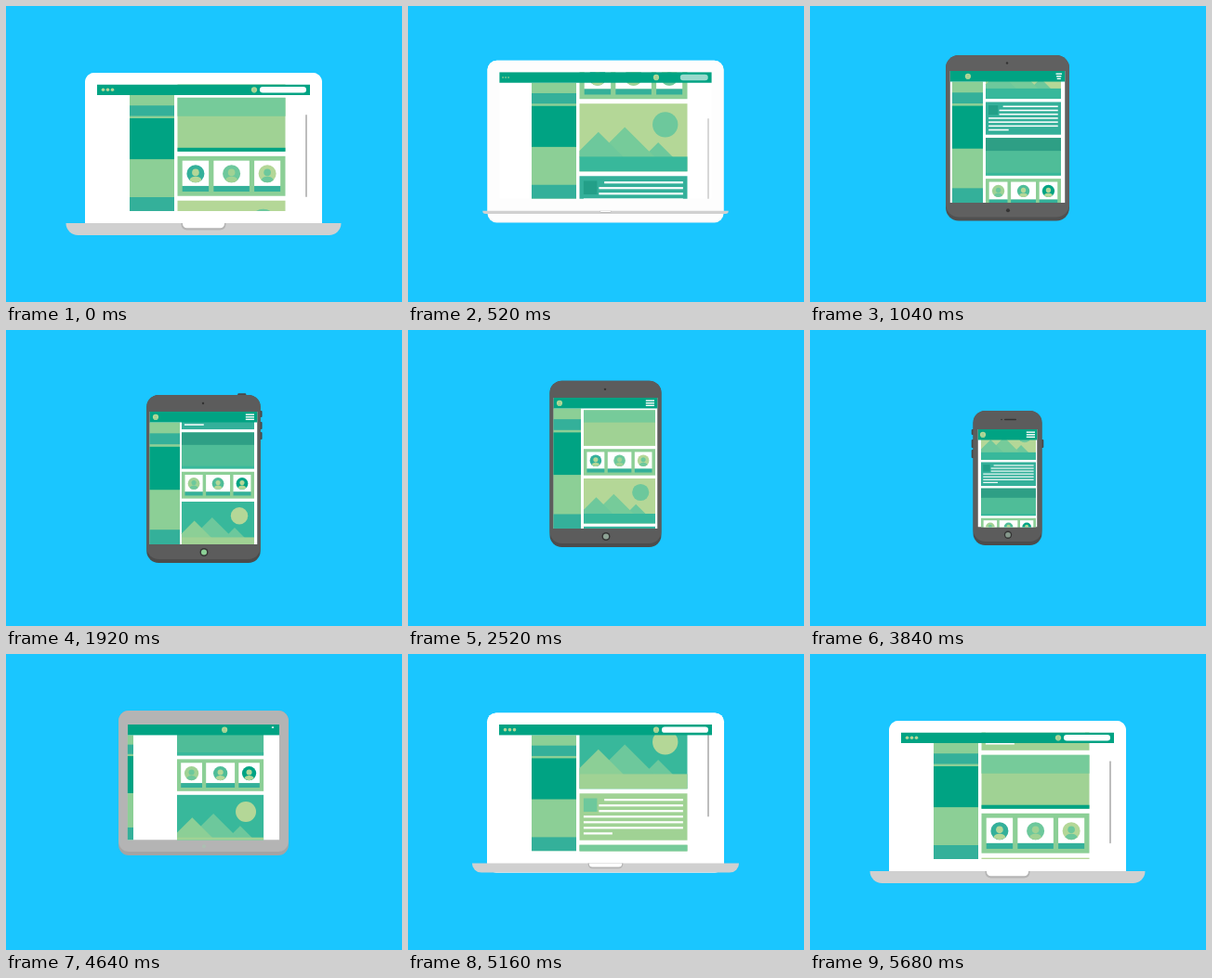
Write an HTML page that moves like this. It is 426 px wide and 319 px high and loops after 5.72 s.

```html
<!DOCTYPE html>
<html lang="en">
<head>
<meta charset="utf-8">
<title>Responsive devices</title>
<style>
  html, body { margin: 0; width: 100%; height: 100%; overflow: hidden; background: #1ac6ff; }
  svg { display: block; width: 100vw; height: 100vh; }
</style>
</head>
<body>
<svg id="stage" viewBox="0 0 426 319"></svg>
<script>
const LOOP = 5720;
const MID = 212.5;
const BAR = 11.5;
const C = {
  dark: '#00a383', deep: '#2e9f85', teal: '#34b09a', sea: '#38b89b', mint: '#4fbd98',
  soft: '#6dc89c', pale: '#76cb9a', leaf: '#8ccf96', lime: '#a0d294', sun: '#b4d797', white: '#fff'
};

// ---------- markup helpers ----------
const rect = (x, y, w, h, fill, more = '') =>
  `<rect x="${x}" y="${y}" width="${w}" height="${h}" fill="${fill}" ${more}/>`;
const circle = (x, y, r, fill, more = '') =>
  `<circle cx="${x}" cy="${y}" r="${r}" fill="${fill}" ${more}/>`;
const path = (d, fill, more = '') => `<path d="${d}" fill="${fill}" ${more}/>`;

function person(x, y, r, back, skin) {
  return `<g transform="translate(${x} ${y}) scale(${r / 10})">` + circle(0, 0, 10, back) +
    circle(0, -1.4, 4, skin) + path('M-6.8 7.3C-6 1.8 6 1.8 6.8 7.3A10 10 0 0 1-6.8 7.3Z', skin) + '</g>';
}

// ---------- feed blocks, drawn 100 units wide ----------
function textBlock(back, icon) {
  const starts = [23, 18, 18, 3.8, 3.8, 3.8, 3.8];
  return rect(0, 0, 100, 43.5, back) + rect(3.8, 4.5, 12.5, 12.5, icon) +
    starts.map((x, i) => rect(x, 5 + i * 5.2, (i < 6 ? 96 : 30.5) - x, 1.9, C.white)).join('');
}
function panelBlock(head, body, foot, id) {
  return rect(0, 0, 100, 50, body) + rect(0, 0, 100, 17.2, head) +
    rect(0, 46.5, 100, 3.5, foot, `id="${id}"`);
}
function cardBlock(looks) {
  const slots = [[4.5, 24.5], [33.5, 33.2], [71.2, 24.2]];
  return rect(0, 0, 100, 37, C.leaf) + slots.map(([x, w], i) =>
    rect(x, 4.2, w, 23.5, C.white) + rect(x, 27.7, w, 5.2, C.teal) +
    person(x + w / 2, 16.3, 8.2, ...looks[i])).join('');
}
function sceneBlock(sky, sun, hills, ground) {
  const peaks = [[73, 36], [42, 21.7], [17.5, 26.3]];
  return rect(0, 0, 100, 63, sky) + circle(79.5, 19.5, 11.8, sun) +
    peaks.map(([x, y], i) => {
      const half = Math.min(x, 50 - y);
      return path(`M${x} ${y}L${x + 50 - y} 50H${x - half}V${y + half}Z`, hills[i]);
    }).join('') + rect(0, 49.3, 100, 13.7, ground);
}

const blocks = [
  [43.5, textBlock(C.teal, '#239f88')],
  [50, panelBlock(C.deep, C.mint, C.sea, 'footTeal')],
  [37, cardBlock([[C.lime, C.soft], [C.mint, C.sun], [C.dark, C.sun]])],
  [63, sceneBlock(C.sea, C.sun, [C.soft, C.soft, C.leaf], C.lime)],
  [43.5, textBlock(C.lime, C.soft)],
  [50, panelBlock(C.pale, C.lime, C.dark, 'footDark')],
  [37, cardBlock([[C.teal, C.sun], [C.soft, C.lime], [C.sun, C.soft]])],
  [63, sceneBlock(C.sun, C.soft, [C.soft, C.pale, C.soft], C.sea)]
];
const GAP = 4.3;
let feedLength = 0;
const tops = blocks.map(([h]) => (feedLength += h + GAP) - h - GAP);

// ---------- stage ----------
const edge = '#484848';
const ink = '#333';
document.getElementById('stage').innerHTML = `
  <clipPath id="screenClip"><rect id="clipRect"/></clipPath>
  ${rect(0, 0, 426, 319, '#1ac6ff')}
  <g id="tabKeys">${[[17, 7], [29, 8], [40, 8]].map(([y, h]) => rect(-3, y, 3, h, edge, 'rx="1"')).join('')}</g>
  ${rect(0, 0, 9, 3, edge, 'rx="1" id="tabTop"')}
  <g id="phoneLeft">${[[20, 6], [31, 9], [42, 9]].map(([y, h]) => rect(0, y, 3, h, edge, 'rx="1"')).join('')}</g>
  ${rect(-3, 0, 3, 9, edge, 'rx="1" id="phoneRight"')}
  <rect id="lip"/><rect id="body"/>
  ${path('', '#d0d0d0', 'id="base"')}${path('', '#b5b5b5', 'id="notchEdge"')}${path('', C.white, 'id="notch"')}
  ${circle(212, 0, 1.2, ink, 'id="camera"')}
  <g id="speaker">${rect(209, -0.7, 13, 1.4, ink, 'rx=".7"')}${circle(206, 0, 0.8, ink)}</g>
  ${circle(213, 0, 0, ink, 'id="ring"')}${circle(213, 0, 0, C.leaf, 'id="button"')}
  <g clip-path="url(#screenClip)">
    <rect id="page" fill="#fff"/>
    <g id="side">${[[0, 1, C.leaf], [.09, .09, C.teal], [.2, .353, C.dark], [.88, .12, C.teal]]
      .map(([y, h, fill]) => rect(0, y, 1, h, fill)).join('')}</g>
    <g id="feed">${blocks.map(([, art], i) => `<g id="block${i}">${art}</g>`).join('')}</g>
    ${rect(322, 0, 2, 89, '#bdbdbd', 'rx="1" id="thumb"')}
    <rect id="bar" height="${BAR}" fill="${C.dark}"/>
    <g id="dots">${[6.5, 11.5, 16.5].map(x => circle(x, 0, 1.8, C.sun)).join('')}</g>
    <rect id="search" height="6.4" rx="3.2" fill="#fff"/>
    <g id="user">${person(0, 0, 3.1, C.sun, C.lime)}</g>
    <g id="menu">${[0, 1, 2].map(i => `<rect id="line${i}" height="1.4" fill="#fff"/>`).join('')}</g>
  </g>`;

const el = {};
document.querySelectorAll('#stage [id]').forEach(node => el[node.id] = node);
function set(id, attrs) {
  for (const name in attrs) el[id].setAttribute(name, attrs[name]);
}
const move = (id, x, y, more = '') => set(id, { transform: `translate(${x} ${y}) ${more}` });

// ---------- poses ----------
const laptop = {
  w: 255, y: 72, h: 172, r: 10, grey: 255, sw: 229, top: 12.5, sh: 136.5, colX: 184.5, colW: 116,
  sideL: 133, sideR: 181, user: 267, menuR: 320, menu: 0, lap: 1, base: 1, home: 0, glow: 0,
  cam: 0, speaker: 0, tabKeys: 0, phoneKeys: 0
};
const lifted = { ...laptop, w: 253, y: 54, h: 176, grey: 250, sw: 228, lap: .4, base: 0 };
const wideTablet = {
  ...laptop, w: 133, y: 53, h: 178.5, r: 14, grey: 96, sw: 124, top: 17, sh: 142, colX: 189, colW: 81,
  sideL: 153, sideR: 186, user: 170, menuR: 271, menu: .7, lap: 0, base: 0, home: 2, cam: 1
};
const tablet = {
  ...wideTablet, w: 122.5, y: 70, h: 181, r: 13, grey: 92, sw: 116, top: 18, sh: 143, colW: 78,
  sideL: 154, sideR: 187, user: 161, menuR: 267, menu: 1, home: 4.5, glow: 1, tabKeys: 1
};
const slimTablet = {
  ...tablet, w: 120, y: 54.7, h: 179.3, sw: 112, top: 18.3, sh: 141, colW: 77,
  sideL: 156, sideR: 186, user: 163, menuR: 265, glow: .55, tabKeys: 0
};
const phone = {
  ...slimTablet, w: 74, y: 87, h: 145, sw: 64, top: 20, sh: 105.5, colX: 184, colW: 59,
  sideL: 164, sideR: 179, user: 186, menuR: 242, home: 4.2, glow: .5, cam: 0, speaker: 1, phoneKeys: 1
};
const growing = {
  ...phone, w: 182.5, y: 61, h: 156, r: 11, grey: 180, sw: 163, top: 15, sh: 124.5, colW: 93,
  sideL: 100, sideR: 137, user: 235, menuR: 288, menu: .25, home: 3, speaker: 0, phoneKeys: 0
};
const poses = [
  [0, laptop],
  [360, laptop],
  [600, lifted],
  [1040, wideTablet],
  [1240, { ...tablet, y: 56, tabKeys: 0, glow: .2, home: 3.5, w: 126 }],
  [1720, { ...tablet, y: 74.5 }],
  [1920, tablet],
  [2060, tablet],
  [2380, { ...slimTablet, y: 56, tabKeys: .2 }],
  [2520, slimTablet],
  [2680, slimTablet],
  [3000, { ...phone, y: 68 }],
  [3360, { ...phone, y: 91 }],
  [3640, { ...phone, y: 86 }],
  [3840, phone],
  [4220, phone],
  [4640, growing],
  [4800, { ...laptop, w: 242, y: 54, h: 166, grey: 245, sw: 217, sideL: 116, sideR: 163, lap: .5, base: 0 }],
  [5000, { ...laptop, y: 55, base: .5 }],
  [5380, { ...laptop, y: 75.5 }],
  [5560, { ...laptop, y: 71 }],
  [5680, laptop]
];
const scrolls = [
  [0, 255.9], [1040, 394.2], [1920, 455.1], [2520, 677.3],
  [3840, 802.1], [4640, 916.9], [5680, 1090.1]
];

// Periodic monotone cubic through [time, value] points; each loop adds gain.
function curve(points, gain = 0) {
  const n = points.length;
  const at = i => {
    const turn = Math.floor(i / n);
    const [t, v] = points[i - turn * n];
    return [t + turn * LOOP, v + turn * gain];
  };
  const rate = i => {
    const [a, b] = [at(i), at(i + 1)];
    return (b[1] - a[1]) / (b[0] - a[0]);
  };
  const slope = i => {
    const [p, q] = [rate(i - 1), rate(i)];
    return p * q <= 0 ? 0 : 2 * p * q / (p + q);
  };
  return time => {
    let i = n - 1;
    while (points[i][0] > time) i--;
    const [t0, v0] = at(i), [t1, v1] = at(i + 1);
    const d = t1 - t0, u = (time - t0) / d, s = 1 - u;
    return v0 * s * s * (1 + 2 * u) + v1 * u * u * (3 - 2 * u) +
      d * u * s * (slope(i) * s - slope(i + 1) * u);
  };
}
const channels = Object.keys(laptop).map(key => [key, curve(poses.map(([t, p]) => [t, p[key]]))]);
const scrollAt = curve(scrolls, 2 * feedLength);
const mod = (a, b) => ((a % b) + b) % b;

// Box with only its lower corners rounded, centred on the stage.
function tray(y, w, h, r) {
  const x = MID - w / 2;
  return `M${x} ${y}h${w}v${h - r}a${r} ${r} 0 0 1 ${-r} ${r}h${2 * r - w}a${r} ${r} 0 0 1 ${-r} ${-r}z`;
}

function draw(time) {
  const p = {};
  for (const [key, value] of channels) p[key] = value(time);
  const left = MID - p.w / 2, right = MID + p.w / 2;
  const sx = MID - p.sw / 2, sy = p.y + p.top;
  const viewY = sy + BAR, viewH = p.sh - BAR, barY = sy + BAR / 2;
  const grey = g => `rgb(${g},${g},${g})`;

  set('lip', { x: left, y: p.y, width: p.w, height: p.h, rx: p.r, fill: grey(Math.round(p.grey - 16 * (1 - p.lap))) });
  set('body', { x: left, y: p.y, width: p.w, height: p.h - 4 * (1 - p.lap), rx: p.r, fill: grey(Math.round(p.grey)) });
  for (const id of ['clipRect', 'page']) set(id, { x: sx, y: sy, width: p.sw, height: p.sh });
  set('bar', { x: sx, y: sy, width: p.sw });

  // Hardware
  const baseY = p.y + 162, b = p.base;
  set('base', { d: tray(baseY, p.w + 41 * b, 13 * b, 13 * b) });
  set('notchEdge', { d: tray(baseY, 48 * b, 7.5 * b, 6 * b) });
  set('notch', { d: tray(baseY, 45 * b, 5.3 * b, 4.5 * b) });
  move('tabKeys', right + 1.8 * p.tabKeys, p.y);
  move('tabTop', right - 24.5, p.y + 1 - 2.8 * p.tabKeys);
  move('phoneLeft', left + 1 - 2.8 * p.phoneKeys, p.y);
  move('phoneRight', right - 1 + 2.8 * p.phoneKeys, p.y + 31);
  for (const id of ['tabKeys', 'tabTop']) set(id, { opacity: p.tabKeys > .02 ? 1 : 0 });
  for (const id of ['phoneLeft', 'phoneRight']) set(id, { opacity: p.phoneKeys > .02 ? 1 : 0 });
  set('camera', { cy: p.y + p.top / 2, opacity: p.cam });
  move('speaker', 0, p.y + p.top / 2 - .5);
  set('speaker', { opacity: p.speaker });
  const homeY = (sy + p.sh + p.y + p.h) / 2 - 1.5;
  const tone = Math.max(0, 1 - (p.grey - 92) / 80);
  set('ring', { cy: homeY, r: p.home, opacity: tone });
  set('button', { cy: homeY, r: p.home * .68, fill: p.glow > .8 ? C.leaf : '#a9c4b2', opacity: Math.min(1, p.glow * 1.4) });

  // Page
  move('side', p.sideL, viewY, `scale(${p.sideR - p.sideL} ${viewH})`);
  const scroll = scrollAt(time), unit = p.colW / 100;
  move('feed', p.colX, viewY, `scale(${unit})`);
  tops.forEach((top, i) => move('block' + i, 0, mod(top - scroll + 80, feedLength) - 80));
  set('footDark', { opacity: p.lap });
  const drift = mod(scroll - scrolls[0][1] + feedLength, 2 * feedLength) - feedLength;
  set('thumb', { y: sy + 32.5 + drift * .22, opacity: p.lap });

  // Top bar
  move('dots', sx, barY, `scale(${p.lap})`);
  set('dots', { opacity: p.lap });
  set('search', { x: sx + p.sw - 4 - 50 * p.lap, y: barY - 3.2, width: 50 * p.lap, opacity: p.lap });
  move('user', p.user, barY);
  for (let i = 0; i < 3; i++) {
    const len = Math.max(0, 9.2 * p.menu - (1 - p.menu) * 4 * i);
    const x = p.menuR - 4.6 * p.menu - len / 2;
    set('line' + i, { x, y: barY - 3.3 + i * 2.6, width: len });
  }
}

const start = performance.now();
function tick() {
  draw((performance.now() - start) % LOOP);
  requestAnimationFrame(tick);
}
draw(0);
requestAnimationFrame(tick);
</script>
</body>
</html>
```
